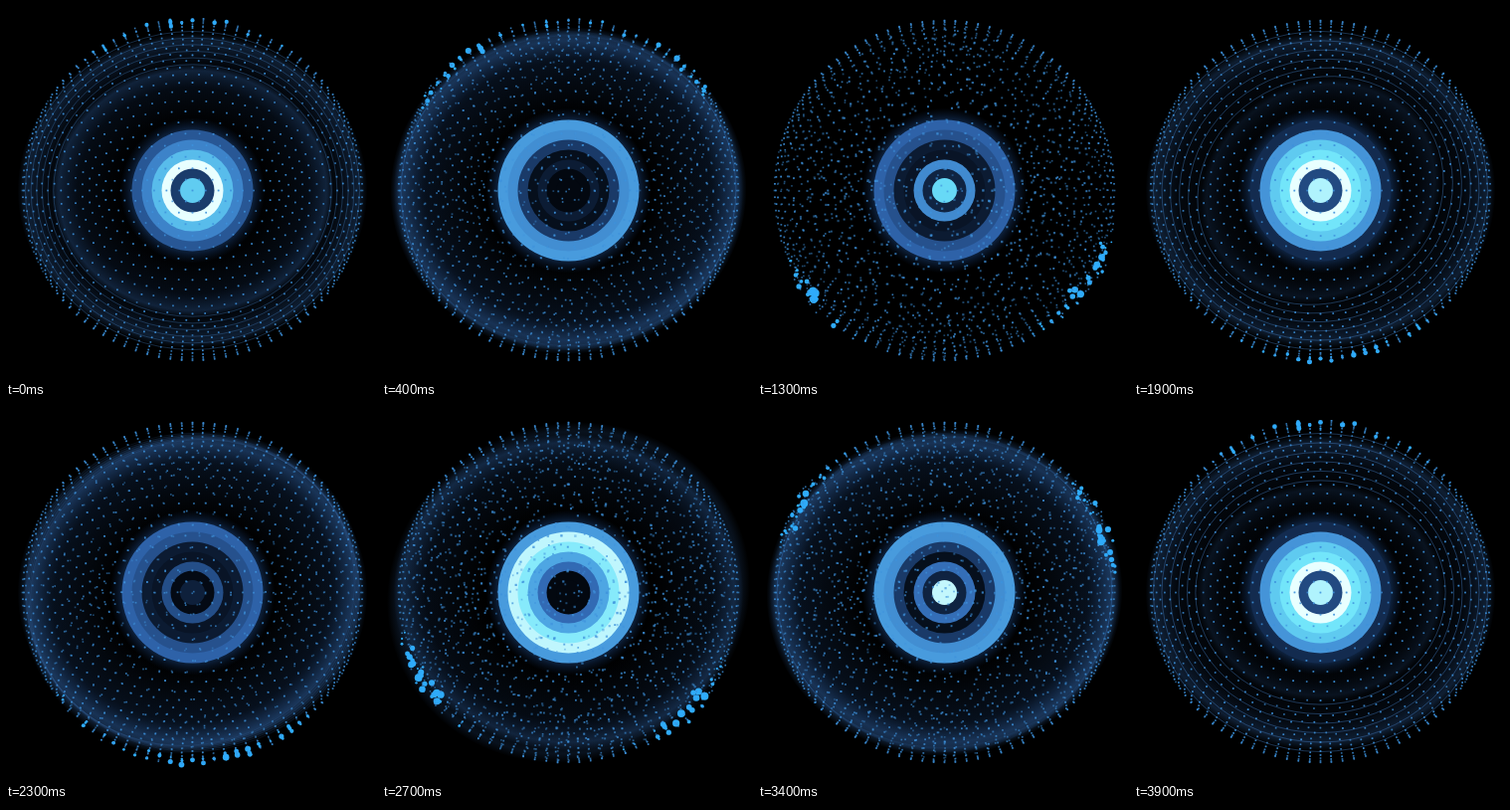
Write an HTML page with a canvas that moves like this. It is 372 px wide and 376 px high and loops after 4000 ms.

```html
<!DOCTYPE html>
<html lang="en">
<head>
<meta charset="utf-8">
<title>Particle sphere</title>
<style>
html, body { margin: 0; height: 100%; overflow: hidden; background: #000; }
canvas { display: block; }
</style>
</head>
<body>
<canvas id="stage" width="372" height="376"></canvas>
<script>
const ctx = document.getElementById('stage').getContext('2d');
const LOOP = 4000, STEP = 100, TAU = Math.PI * 2;
const CX = 187.5, CY = 185.5, R = 171;

let seed = 7;
const random = () => (seed = seed * 16807 % 2147483647) / 2147483647;
const clamp = v => Math.max(0, Math.min(1, v));
const mix = (a, b, f) => a + (b - a) * f;
const wave = (cycles, peak) => Math.cos(TAU * (cycles - peak));

// Evenly spaced stops from unlit to white-hot
const palette = [
  [3, 8, 16], [24, 54, 98], [50, 106, 180],
  [74, 158, 224], [108, 228, 250], [232, 255, 255]
];
function tone(level) {
  const pos = clamp(level) * 4.999, i = Math.floor(pos);
  return `rgb(${palette[i].map((c, k) => mix(c, palette[i + 1][k], pos - i))})`;
}

// Subdivided icosahedron projected onto the unit sphere
function buildDots(freq) {
  const g = (1 + Math.sqrt(5)) / 2, corners = [], dots = new Map();
  for (const a of [-1, 1]) for (const b of [-g, g])
    corners.push([b, a, 0], [a, 0, b], [0, b, a]);
  const near = (p, q) => Math.abs(Math.hypot(...p.map((v, i) => v - q[i])) - 2) < .01;
  corners.forEach((p, i) => corners.forEach((q, j) => corners.forEach((r, k) => {
    if (!(i < j && j < k && near(p, q) && near(q, r) && near(p, r))) return;
    for (let u = 0; u <= freq; u++) for (let v = 0; u + v <= freq; v++) {
      const point = p.map((c, n) => c * u + q[n] * v + r[n] * (freq - u - v));
      const len = Math.hypot(...point);
      const [x, y, z] = point.map(c => c / len);
      dots.set([x, y, z].map(c => Math.round(c * 1000)).join(), {
        x, y, rim: Math.hypot(x, y),
        angle: random() * TAU, drift: random(), size: random(), lift: random()
      });
    }
  })));
  return [...dots.values()];
}
const dots = buildDots(16);

function ellipse(cx, cy, rx, ry, tilt = 0) {
  ctx.beginPath();
  ctx.ellipse(cx, cy, rx, ry, tilt, 0, TAU);
}

function disc(radius, fill) {
  ctx.fillStyle = fill;
  ellipse(CX, CY, radius, radius);
  ctx.fill();
}

// Translucent disc, brightest just inside its edge
function glassDisc(rx, ry, tilt, alpha) {
  ctx.save();
  ctx.translate(CX, CY);
  ctx.rotate(tilt);
  ctx.scale(rx, ry);
  const fill = ctx.createRadialGradient(0, 0, .5, 0, 0, 1.06);
  fill.addColorStop(0, 'rgba(34,80,145,0)');
  fill.addColorStop(.65, `rgba(34,80,145,${.12 * alpha})`);
  fill.addColorStop(.9, `rgba(52,106,176,${.36 * alpha})`);
  fill.addColorStop(1, 'rgba(52,106,176,0)');
  ctx.fillStyle = fill;
  ellipse(0, 0, 1.06, 1.06);
  ctx.fill();
  ctx.restore();
}

// A ripple grows from the orb to the rim once a second
function drawShell(time) {
  const ripple = (time / 1000 + .2) % 1;
  const r = 88 + 78 * (1 - (1 - ripple) ** 3);
  const rx = r + 8, ry = r - 6;
  const tilt = -.25 * (1 - wave(time / LOOP, 0));
  const alpha = 1 - Math.exp(-(((time - 1300) / 320) ** 2));
  glassDisc(166, 150, 0, alpha * .8);
  glassDisc(rx, ry, tilt, alpha * clamp(ripple * 4) * (1 - ripple ** 6));
  ctx.lineWidth = 1;
  ctx.strokeStyle = `rgba(70,130,200,${.5 * (1 - ripple) ** 2 * alpha})`;
  for (let f = 0; f < .9; f += 1 / 6) {
    ellipse(CX, CY, mix(168, rx, f), mix(160, ry, f), tilt * f);
    ctx.stroke();
  }
}

// Brightness runs inward through the rings; the core pulses at half that rate
function drawOrb(time) {
  const core = clamp(.38 + .6 * wave(time / 2000, .82));
  const rings = [.45, .42, .47, .55, .37].map((mid, i) =>
    mid + Math.min(mid, .4) * wave(time / 1000, .97 - .105 * i));
  rings[0] = clamp(rings[0] + .4 * core);
  const edge = rings[4] > .05 ? 71 : 61;
  const glow = ctx.createRadialGradient(CX, CY, edge - 4, CX, CY, edge + 12);
  glow.addColorStop(0, 'rgba(40,95,170,.5)');
  glow.addColorStop(1, 'rgba(20,60,120,0)');
  disc(edge + 12, glow);
  for (let i = 4; i >= 0; i--)
    if (rings[i] > .05 || i < 4) disc(31 + i * 10, tone(rings[i]));
  disc(22, tone(core * rings[0] * .35));
  disc(12.5, tone(core * 1.15));
}

// A sweeping band throws rim dots outward while the rest drift off the grid
function drawDots(time) {
  const turn = time / LOOP * TAU, swing = Math.sin(turn);
  const stir = swing * swing;
  const sweep = -Math.cos(turn + .18 * swing);
  for (const d of dots) {
    const offset = (d.y - sweep + .12 * swing * d.x) / .26;
    const flare = d.rim > .965 ? Math.exp(-offset * offset) : 0;
    const drift = stir * d.drift ** 2 * 14 * (1 - d.rim ** 6);
    const angle = d.angle + turn;
    const reach = R + flare * (d.lift - .45) * 14 * (.3 + stir);
    const x = CX + d.x * reach + Math.cos(angle) * drift;
    const y = CY + d.y * reach + Math.sin(angle) * drift;
    const big = flare * d.size ** 3 * (2.4 + 2.2 * Math.abs(swing));
    if (big > .9) {
      ctx.fillStyle = '#2fabfa';
      ellipse(x, y, big, big);
      ctx.fill();
    } else {
      const size = 1.6 + stir * d.size * (1 - d.rim ** 6);
      ctx.fillStyle = `rgba(62,146,220,${.4 + .4 * d.lift})`;
      ctx.fillRect(x - size / 2, y - size / 2, size, size);
    }
  }
}

function draw(now) {
  const time = Math.floor(now % LOOP / STEP) * STEP;
  ctx.fillStyle = '#000';
  ctx.fillRect(0, 0, 372, 376);
  drawShell(time);
  drawOrb(time);
  drawDots(time);
  requestAnimationFrame(() => draw(performance.now() - start));
}
const start = performance.now();
draw(0);
</script>
</body>
</html>
```
